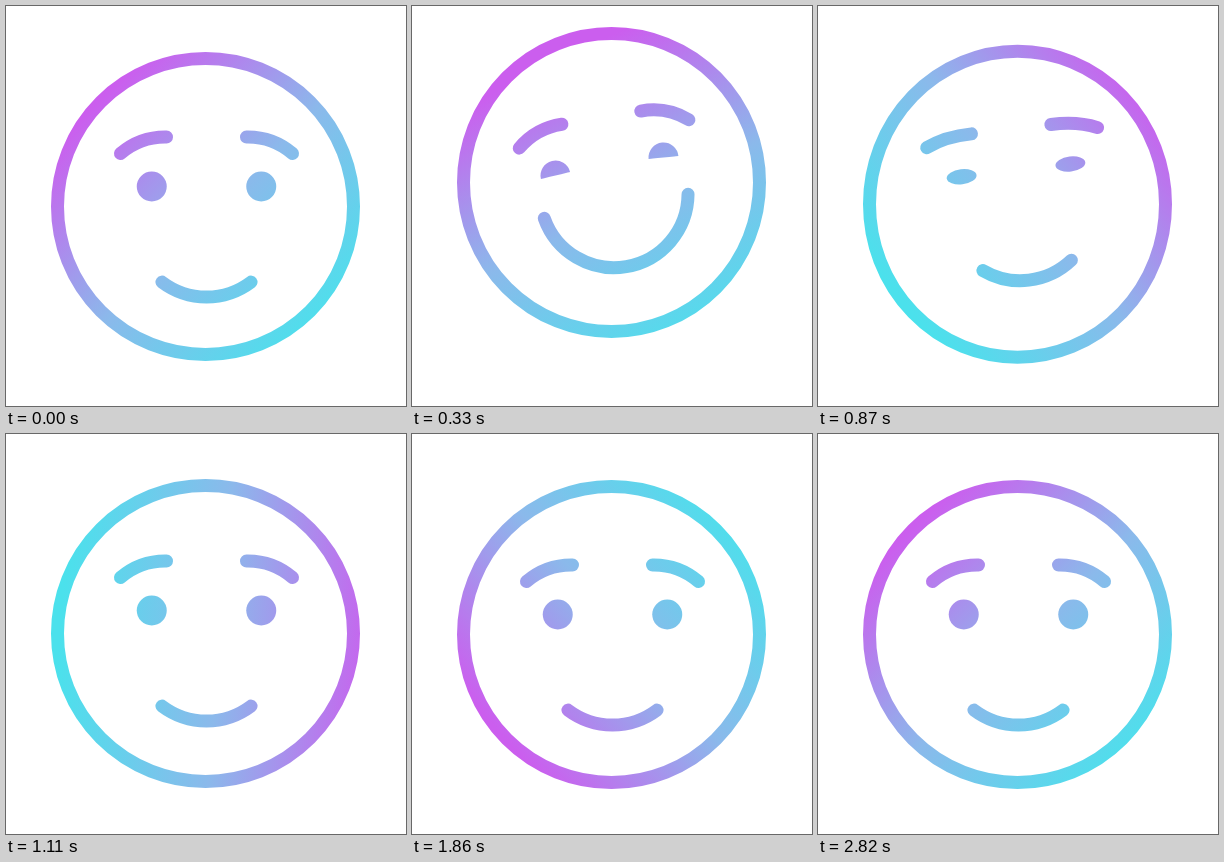
Recreate the animation shown at these times as an HTML page. Size 400 by 400 pixels, loop 5150 ms.

```html
<!DOCTYPE html>
<html lang="en">
<head>
<meta charset="utf-8">
<title>Smiling face</title>
<style>
  html, body { margin: 0; width: 100%; height: 100%; overflow: hidden; background: #fff; }
  svg { display: block; width: 100%; height: 100%; }
  .line { fill: none; stroke: #fff; stroke-width: 13; stroke-linecap: round; }
</style>
</head>
<body>
<svg viewBox="0 0 400 400">
  <defs>
    <linearGradient id="tint" gradientUnits="userSpaceOnUse" x1="54" y1="200" x2="374" y2="200">
      <stop offset="0" stop-color="#cb5eee"/>
      <stop offset=".5" stop-color="#8bb9eb"/>
      <stop offset="1" stop-color="#4be1ec"/>
    </linearGradient>
    <mask id="shape" maskUnits="userSpaceOnUse" x="0" y="0" width="400" height="400">
      <ellipse id="head" class="line" cx="199.5" rx="148"/>
      <g id="face">
        <g id="side">
          <path id="brow" class="line"/>
          <path id="eye" fill="#fff"/>
        </g>
        <use href="#side" transform="scale(-1 1)"/>
        <path id="mouth" class="line"/>
      </g>
    </mask>
  </defs>
  <rect width="400" height="400" fill="url(#tint)" mask="url(#shape)"/>
</svg>
<script>
const LOOP = 5150, TURN = 2820;
const EYE = 15, MOUTH = 74;

const set = (id, name, value) => document.getElementById(id).setAttribute(name, value);
const clamp = x => Math.min(1, Math.max(0, x));
const progress = (now, from, to) => clamp((now - from) / (to - from));
const smooth = x => x * x * (3 - 2 * x);
const mix = (a, b, x) => a + (b - a) * x;

function drawHead(smile, squint, lift) {
  set('head', 'cy', 200.5 - 24 * smile ** 4 + lift / 4);
  set('head', 'ry', 148 + smile + 4.5 * squint);
}

// Brow and eye are drawn for the left side and mirrored for the right.
function drawSide(smile, open, squint, drift) {
  const drop = 8 * squint;
  set('brow', 'd', `M-86 -33Q-66 ${-50 + drop} -40 ${-49.5 + drop}`);

  const above = EYE * mix(0.5, 1, Math.abs(2 * smile - 1));
  const below = Math.max(0.01, EYE * (1 - smile));
  set('eye', 'd', `M${-EYE} 0A${EYE} ${above} 0 0 1 ${EYE} 0A${EYE} ${below} 0 0 1 ${-EYE} 0Z`);
  set('eye', 'transform', `translate(-54.75) rotate(${open * mix(-4, 13, drift)})`);
}

function drawMouth(open) {
  const half = mix(37, 80, open) * Math.PI / 180;
  const x = MOUTH * Math.sin(half);
  const y = mix(36.5, 27.5, open) + MOUTH * Math.cos(half);
  set('mouth', 'd', `M${-x} ${y}A${MOUTH} ${MOUTH} 0 0 0 ${x} ${y}`);
}

function draw(now) {
  const smile = smooth(progress(now, 0, 330)) * (1 - smooth(progress(now, 690, 1050)));
  const open = clamp(2 * smile - 1);
  const squint = 4 * smile * (1 - smile);
  const drift = smooth(progress(now, 330, 690));
  const lift = -5.4 * Math.sin(Math.PI * progress(now, 780, 1230));
  const turn = 360 * smooth(progress(now, 0, TURN) ** 0.92);

  drawHead(smile, squint, lift);
  drawSide(smile, open, squint, drift);
  drawMouth(open);

  const x = 200.5 - smile * mix(3, 5, drift);
  const y = 180.5 - smile * mix(20, 26, drift) + lift;
  set('face', 'transform', `translate(${x} ${y}) rotate(${-smile * mix(9.5, 13.5, drift)})`);
  set('tint', 'gradientTransform', `rotate(${45 + turn} 214 200)`);
}

const start = performance.now();
function tick() {
  draw((performance.now() - start) % LOOP);
  requestAnimationFrame(tick);
}
tick();
</script>
</body>
</html>
```
